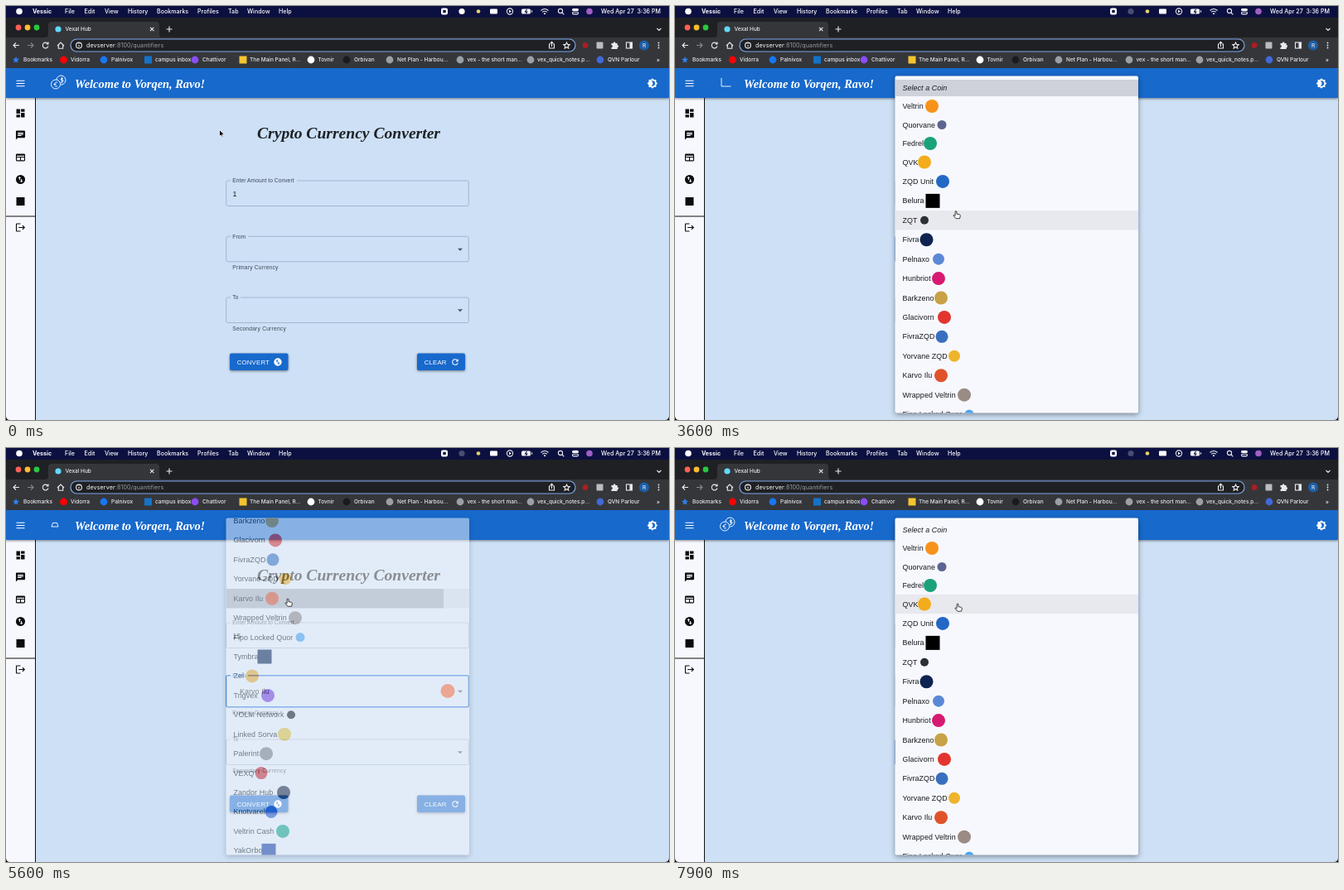
Recreate the animation shown at these times as an HTML page. Size 800 by 500 pixels, loop 8 s.

```html
<!DOCTYPE html>
<html lang="en">
<head>
<meta charset="utf-8">
<style>
html, body { margin: 0; width: 100%; height: 100%; overflow: hidden; background: #000; }
svg { display: block; width: 800px; height: 500px; }
text { font: 8.9px "Liberation Sans", Arial, sans-serif; letter-spacing: .08px; white-space: pre; }
.menu { font: 500 7.1px Inter, sans-serif; letter-spacing: 0; fill: #fff; }
.strip { font: 500 6.5px Inter, sans-serif; letter-spacing: 0; fill: #e8eaed; }
.url { font: 7.1px Inter, sans-serif; letter-spacing: .12px; fill: #fff; }
.small { font-size: 6.67px; letter-spacing: .06px; }
.help { font-size: 6.67px; letter-spacing: .22px; fill: #3d4a59; }
.btn { font-size: 7.78px; letter-spacing: .22px; fill: #fff; }
.script { font: italic bold 19.6px "Liberation Serif", Times, serif; letter-spacing: 0; }
.line { fill: none; stroke: #e8eaed; stroke-width: 1.1; }
.lift { filter: drop-shadow(0 1px 1.5px #0007); }
</style>
</head>
<body>
<svg viewBox="0 0 800 500">
  <defs><clipPath id="sheet"><rect x="265.5" y="84.5" width="293.5" height="407" rx="2"/></clipPath></defs>
  <g id="page"></g>
  <g id="live"></g>
</svg>
<script>
const LOOP = 8000, STEP = 100;
const BLUE = '#1769cc', BG = '#cde0f5', PAPER = '#f7f8fd';

const text = (x, y, s, more = '') => `<text x="${x}" y="${y}" ${more}>${s}</text>`;
const rect = (x, y, w, h, fill, more = '') =>
  `<rect x="${x}" y="${y}" width="${w}" height="${h}" fill="${fill}" ${more}/>`;
const disc = (x, y, r, fill, more = '') => `<circle cx="${x}" cy="${y}" r="${r}" fill="${fill}" ${more}/>`;
const line = (d, more = '') => `<path class="line" d="${d}" ${more}/>`;
const icon = (x, y, d, fill, k = .5556) =>
  `<path d="${d}" fill="${fill}" fill-rule="evenodd" transform="translate(${x} ${y}) scale(${k}) translate(-12 -12)"/>`;
const clamp = v => Math.max(0, Math.min(1, v));
const ease = v => (v = clamp(v), v * v * (3 - 2 * v));

const SWAP = 'M12 2a10 10 0 1 0 0 20a10 10 0 1 0 0-20zM6.5 9L10 5.5 13.5 9H11v4H9V9zM17.5 15L14 18.5 10.5 15H13v-4h2v4z';
const REFRESH = 'M17.65 6.35C16.2 4.9 14.2 4 12 4a8 8 0 1 0 7.73 10h-2.08A6 6 0 1 1 12 6c1.66 0 3.14.69 4.22 1.78L13 11h7V4z';
const SIDE = [
  [129.5, 'M3 13h8V3H3zm0 8h8v-6H3zm10 0h8V11h-8zm0-18v6h8V3z'],
  [156, 'M20 2H4a2 2 0 0 0-2 2v18l4-4h14a2 2 0 0 0 2-2V4a2 2 0 0 0-2-2zM6 9h12v2H6zm8 5H6v-2h8zm4-6H6V6h12z'],
  [183, 'M20 4H4a2 2 0 0 0-2 2v12a2 2 0 0 0 2 2h16a2 2 0 0 0 2-2V6a2 2 0 0 0-2-2zM4 8h16v2H4zM4 12h7v6H4zm9 0h7v6h-7z'],
  [209.5, SWAP],
  [236, 'M3 3h18v18H3z'],
  [267.5, 'M17 7l-1.4 1.4 2.6 2.6H8v2h10.2l-2.6 2.6L17 17l5-5zM4 5h8V3H4a2 2 0 0 0-2 2v14a2 2 0 0 0 2 2h8v-2H4z']
];
const SUN = 'M20 8.7V4h-4.7L12 .7 8.7 4H4v4.7L.7 12 4 15.3V20h4.7l3.3 3.3 3.3-3.3H20v-4.7l3.3-3.3zM12 18c-.9 0-1.7-.2-2.5-.55a6 6 0 0 0 0-10.9A6 6 0 1 1 12 18z';

// name, badge centre, colour, badge radius, square badge
const COINS = [
  ['Veltrin', 310, '#f7931a'], ['Quorvane', 322, '#5c6490', 5.5], ['Fedrel', 308, '#1aa27a'],
  ['QVK', 301, '#f3ac1b'], ['ZQD Unit', 323, '#2268c4'], ['Belura', 311, '#000', 8.5, 1],
  ['ZQT', 301, '#2b2f36', 5], ['Fivra', 303.5, '#0f2350'], ['Pelnaxo', 318, '#5b88d6', 7],
  ['Hunbriot', 318, '#d61a72'], ['Barkzeno', 321, '#c8a246'], ['Glacivorn', 325, '#e2352f'],
  ['FivraZQD', 322, '#3a6fc0', 7.5], ['Yorvane ZQD', 337, '#efb42c', 7], ['Karvo Ilu', 321, '#e0532a'],
  ['Wrapped Veltrin', 349, '#9a8c84'], ['Fipo Locked Quor', 355, '#4aa3ee', 5.5],
  ['Tymbra', 312, '#0b2350', 8.5, 1], ['Zel', 297, '#f2ac2c'], ['Trigvex', 316, '#7a3fdc'],
  ['VOLM Network', 344, '#111', 5], ['Linked Sorva', 336, '#e9c638'], ['Palerint', 314, '#7f7f82'],
  ['VEXQ', 308, '#d02a30', 7.5], ['Zandor Hub', 335, '#20263f'], ['Knotvarel', 320, '#2a59d6', 7.5],
  ['Veltrin Cash', 334, '#14a884'], ['YakOrbo', 317, '#1b3fa4', 8.5, 1]
];
const rowY = i => i < 4 ? 121 + 22.5 * i : 188.5 + 23.43 * (i - 3);

function menuBar() {
  const items = [['File', 71], ['Edit', 94.5], ['View', 119], ['History', 147], ['Bookmarks', 182],
    ['Profiles', 231], ['Tab', 268], ['Window', 291], ['Help', 329]];
  return rect(0, 0, 800, 14, '#0c1040') + disc(16, 6.5, 3.8, '#fff') +
    text(32, 9.3, 'Vessic', 'class="menu" style="font-weight:700"') +
    items.map(([s, x]) => text(x, 9.3, s, 'class="menu"')).join('') +
    text(790, 9.3, 'Wed Apr 27  3:36 PM', 'class="menu" text-anchor="end"') +
    rect(525, 2.5, 8, 8, '#fff', 'rx="2"') + rect(527.3, 4.8, 3.4, 3.4, '#0c1040') +
    disc(570, 6.5, 2.3, '#e5d36a') + rect(584, 3.5, 9, 6, '#fff', 'rx="1"') +
    disc(608, 6.5, 3.6, 'none', 'class="line"') + '<path d="M607 4.8l3 1.7-3 1.7z" fill="#fff"/>' +
    rect(622, 3.5, 11, 6, '#fff', 'rx="1.5"') + rect(634, 5.3, 1, 2.4, '#fff') +
    line('M628.5 4l-2 3h2.4l-1.6 2.3', 'style="stroke:#0c1040"') +
    line('M645.5 5.5q4.5-4 9 0M647.2 7.4q2.8-2.4 5.6 0') + disc(650, 9.2, 1, '#fff') +
    disc(669, 6, 2.6, 'none', 'class="line"') + line('M671 8l2.3 2.3') +
    rect(683, 3, 8, 3, '#fff', 'rx="1.5"') + rect(683.5, 7.3, 7, 2.6, 'none', 'class="line" rx="1.3"') +
    disc(704, 6.5, 3.8, '#a25fc4');
}

function browser() {
  const links = [['Bookmarks', 21], ['Vidorra', 78, 69.5, '#f00'], ['Palnivox', 127, 118, '#1877f2'],
    ['campus inbox', 180, 171.5, '#1473c8', 1], ['Chattivor', 237, 228, '#8a4df5'],
    ['The Main Panel, R...', 294, 286, '#f4c430', 1], ['Tovnir', 376.5, 368, '#fff'], ['Orbivan', 420, 411, '#1a1b1e'],
    ['Net Plan - Harbou...', 472, 463, '#9aa0a6'], ['vex - the short man...', 556.5, 548, '#9aa0a6'],
    ['vex_quick_notes.p...', 641, 633, '#9aa0a6'], ['QVN Parlour', 726, 717, '#4169d8']];
  return rect(0, 14, 800, 25, '#1f2023') + rect(0, 38, 800, 37, '#35363a') +
    '<path d="M47 38q4 0 4-4V23q0-4 4-4h126q4 0 4 4v11q0 4 4 4z" fill="#35363a"/>' +
    ['#ff5f57', '#febc2e', '#28c840'].map((c, i) => disc(15 + 11 * i, 26, 3.4, c)).join('') +
    disc(63, 28, 3.6, '#61dafb') + text(71.5, 30.4, 'Vexal Hub', 'class="strip"') +
    line('M174 25.8l4.4 4.4M178.4 25.8l-4.4 4.4M193.5 28h7M197 24.5v7M785.5 27l2.5 2.5 2.5-2.5') +
    line('M16 47.5H9M12 44.5l-3 3 3 3') + line('M26 47.5h7M30 44.5l3 3-3 3', 'opacity=".45"') +
    line('M50.5 45.5a3.4 3.4 0 1 0 .5 3M51 43.5v2.5h-2.5') + line('M62 48l4-4 4 4M63.3 47v4.3h5.4V47') +
    rect(78, 40, 609, 15, '#1f2023', 'rx="7.5" stroke="#7ba7ea" stroke-width="1.2"') +
    disc(88, 47.5, 3.4, 'none', 'class="line"') + line('M88 47v2.3M88 45.3v.8') +
    text(97, 50, 'devserver<tspan fill="#9aa0a6">:8100/quantifiers</tspan>', 'class="url"') +
    line('M657 46h-1.5v5h6v-5H660M658.5 49v-5.5M656.8 45l1.7-1.7 1.7 1.7') +
    line('M676.5 44l1.1 2.4 2.6.3-2 1.8.6 2.6-2.3-1.4-2.3 1.4.6-2.6-2-1.8 2.6-.3z') +
    disc(699, 47.5, 3.4, '#a81f24') + rect(712.5, 43.5, 8, 8, '#b9bcc1', 'rx="1"') +
    '<path d="M730.5 45h2.2a1.4 1.4 0 0 1 2.8 0h2.2v2.3a1.4 1.4 0 0 1 0 2.8v2h-7.2v-2a1.4 1.4 0 0 0 0-2.8z" fill="#e8eaed"/>' +
    rect(748.5, 44, 7, 7, 'none', 'class="line"') + rect(752.5, 44, 3, 7, '#e8eaed') +
    disc(770, 47.5, 6, '#1d5fa8') + text(770, 50, 'R', 'class="strip" text-anchor="middle"') +
    [44.5, 47.5, 50.5].map(y => disc(787.5, y, .9, '#e8eaed')).join('') +
    '<path d="M12 61l1.2 2.6 2.8.3-2.1 1.9.6 2.8-2.5-1.4-2.5 1.4.6-2.8L8 63.9l2.8-.3z" fill="#2f80ed"/>' +
    links.map(([s, x, cx, c, sq]) => text(x, 67.4, s, 'class="strip"') +
      (cx ? sq ? rect(cx - 4.5, 60.5, 9, 9, c) : disc(cx, 65, 4.4, c) : '')).join('') +
    text(785, 67.4, '»', 'class="strip"');
}

function app() {
  const button = (x, w, s, d, ix) => rect(x, 419.5, w, 20.5, BLUE, 'rx="2" class="lift"') +
    text(x + 8.7, 432.6, s, 'class="btn"') + icon(ix, 430, d, '#fff', .47);
  return rect(0, 75, 800, 425, BG) +
    text(303, 160, 'Crypto Currency Converter', 'class="script" fill="#1d2126"') +
    button(270, 70.5, 'CONVERT', SWAP, 328) + button(496, 58, 'CLEAR', REFRESH, 542) +
    rect(0, 111, 36, 389, PAPER) + rect(35, 111, 1, 389, '#111') + rect(0, 253.5, 36, 1, '#111') +
    SIDE.map(([y, d]) => icon(17.5, y, d, '#0c0c0e')).join('') +
    rect(0, 75, 800, 36, BLUE, 'class="lift"') +
    line('M12.5 90.2h10M12.5 93.5h10M12.5 96.8h10', 'style="stroke:#fff"') +
    icon(780, 93.5, SUN, '#fff') +
    text(83, 98.5, 'Welcome to Vorqen, Ravo!', 'class="script" style="font-size:14.4px" fill="#fff"') +
    '<path d="M0 495v5h5q-5 0-5-5zM800 495v5h-5q5 0 5-5z"/>';
}

// start time, delay between strokes, strokes
const ring = (x, y, r) => `M${x - r} ${y}a${r} ${r} 0 1 1 ${2 * r} 0a${r} ${r} 0 1 1 ${-2 * r} 0`;
const GLYPHS = [
  [900, 200, ['M58.5 86h9v12h-9z', ring(63, 92, 2)]],
  [3400, 200, ['M56 87v10h11.5', 'M59 95v-3', 'M62 95v-5', 'M65 95v-7']],
  [4300, 200, [ring(62.5, 92.5, 5.5), ring(62.5, 92.5, 1.5)]],
  [5300, 400, ['M55 95l1.5-4.5h5l1.5 4.5z', 'M63 95l1.5-4.5h5l1.5 4.5z', 'M59 90l1.5-4h5l1.5 4z']],
  [7100, 150, [ring(60, 94.5, 5.5), 'M61 89a5.5 5.5 0 1 1 5 6', 'M62 92.3q-3-1-3.3 2.2t3.3 2.2M57.5 94.5h3',
    'M69 87.8q-2.6-1.2-2.8.4t2 1.4.2 2-2.6.2M67.4 86v6.5']]
];
function emblem(t) {
  if (t < 900) t += LOOP;
  const [start, gap, strokes] = GLYPHS.filter(g => g[0] <= t).pop();
  return strokes.map((d, i) => {
    const p = clamp((t - start - i * gap) / 200);
    return p ? line(d, `pathLength="1" stroke-dasharray="${p} 2" style="stroke:#fff;stroke-width:.9"`) : '';
  }).join('');
}

function field(y, h, label, notch, focus) {
  const c = focus ? BLUE : '#9db1ca';
  return rect(265.7, y, 292.6, h, 'none', `rx="2" stroke="${c}" stroke-width="${focus ? 1.4 : .9}"`) +
    rect(271, y - 1, notch, 2, BG) + text(273.3, y + 2.2, label, `class="small" fill="${focus ? BLUE : '#3d4a59'}"`);
}

function form(t) {
  const typing = t >= 1400 && t < 2800, picked = t >= 5500;
  const fromOn = t >= 2800 && t < 6600, toOn = t >= 6600;
  const top = picked ? 274.7 : 278.3;
  const value = t < 2000 ? '1' : '15';
  const arrow = (y, up) => `<path d="M545 ${up ? y + 1.3 : y - 1.3}h6l-3 ${up ? -3 : 3}z" fill="#48525f"/>`;
  return field(211, 30.5, 'Enter Amount to Convert', 80, typing) + text(273.5, 229.8, value, 'fill="#16191d"') +
    (typing ? rect(542, 219, 9, 15, '#eef1f5', 'rx="1"') +
      '<path d="M544.6 225l2-3 2 3zM544.6 228l2 3 2-3z" fill="#333"/>' : '') +
    (typing && (t - 1400) % 1000 < 500 ? rect(273.8 + 5 * value.length, 222, .8, 9.5, '#111') : '') +
    field(top, picked ? 38 : 30.5, 'From', 21, fromOn) + arrow(294, false) +
    text(273.3, picked ? 322.2 : 318.4, 'Primary Currency', 'class="help"') +
    (picked ? text(282, 297, 'Karvo Ilu', 'fill="#16191d"') + disc(533, 293.5, 8.5, '#e0532a') : '') +
    field(352, 30.5, 'To', 12, toOn) + arrow(367.5, toOn) +
    text(273.3, 392.4, 'Secondary Currency', 'class="help"');
}

const PATH = [[0, 257.5, 149.5], [600, 257.5, 149.5], [1300, 347, 225], [2300, 347, 225], [2700, 340, 292],
  [2900, 340, 292], [3400, 339, 247.5], [4200, 339, 247.5], [4700, 343, 180], [5400, 343, 180],
  [5600, 340, 182], [5800, 340, 182], [6400, 334, 377], [6800, 334, 377], [7500, 341, 188], [LOOP, 341, 188]];
function mouseAt(t) {
  const i = PATH.findIndex(k => k[0] > t), [a, x, y] = PATH[i - 1], [b, u, v] = PATH[i];
  const p = ease((t - a) / (b - a));
  return [x + (u - x) * p, y + (v - y) * p];
}

function list(t, my) {
  const first = t < 6000, start = first ? 2800 : 6600;
  const p = ease((t - start) / 230);
  const alpha = first ? p * p * clamp((5700 - t) / 200) : p * p;
  if (!alpha) return '';
  const scroll = first ? 264.5 * ease((t - 3700) / 900) : 0;
  const ox = 412, oy = first ? 310 : 386;
  const rows = COINS.map(([name, cx, c, r = 8, sq], i) => {
    const y = rowY(i) - scroll;
    if (y < 70 || y > 505) return '';
    const hover = p > .99 && Math.abs(y - my) < 11.72;
    const ripple = hover && first && t >= 5500 ? 162.5 + (t - 5500) : 0;
    return (hover ? rect(265.5, y - 11.7, 293.5, 23.4, '#e8e9ee') : '') +
      (ripple ? rect(265.5, y - 11.7, ripple, 23.4, '#000', 'opacity=".2"') : '') +
      text(274.5, y + 3, name, 'fill="#16191d"') +
      (sq ? rect(cx - r, y - r, 2 * r, 2 * r, c) : disc(cx, y, r, c));
  }).join('');
  const head = (first ? rect(265.5, 89 - scroll, 293.5, 20, '#cfd1d9') : '') +
    text(274.5, 102 - scroll, 'Select a Coin', 'fill="#16191d" style="font-style:italic"');
  return `<g opacity="${alpha}" transform="translate(${ox} ${oy}) scale(${.75 + .25 * p} ${.5625 + .4375 * p}) translate(${-ox} ${-oy})">` +
    rect(265.5, 84.5, 293.5, 407, PAPER, 'rx="2" style="filter:drop-shadow(0 2px 3px #0006)"') +
    `<g clip-path="url(#sheet)">${head}${rows}</g></g>`;
}

function pointer(x, y, open) {
  const within = (a, b) => x > 265 && x < 559 && y > a && y < b;
  const [d, fill, stroke] = open || within(275, 312) || within(352, 383)
    ? ['M-.9.6q.9-1.2 1.8 0v3l3.6.8q1 .4.8 1.6l-.8 3.2h-4.6l-3-3.6q.2-1.2 1.5-.3l.7.6z', '#fff', '#111']
    : within(211, 242)
      ? ['M-1.8-4q1.8 0 1.8 1v6q0 1-1.8 1M1.8-4q-1.8 0-1.8 1v6q0 1 1.8 1M-1 .8h2', 'none', '#111']
      : ['M0 0v8l2-1.8 1.3 2.8 1.3-.6-1.2-2.7h2.6z', '#000', '#fff'];
  return `<path transform="translate(${x} ${y})" d="${d}" fill="${fill}" stroke="${stroke}" stroke-width=".8"/>`;
}

const page = document.getElementById('page'), live = document.getElementById('live');
page.innerHTML = app() + menuBar() + browser();

const began = performance.now();
let shown = -1;
function frame() {
  const t = Math.floor((performance.now() - began) % LOOP / STEP) * STEP;
  if (t !== shown) {
    shown = t;
    const [x, y] = mouseAt(t), sheet = list(t, y);
    live.innerHTML = disc(550, 6.5, 3.6, t < 500 ? '#fff' : '#4a4d70') +
      emblem(t) + form(t) + sheet + pointer(x, y, sheet !== '');
  }
  requestAnimationFrame(frame);
}
frame();
</script>
</body>
</html>
```
